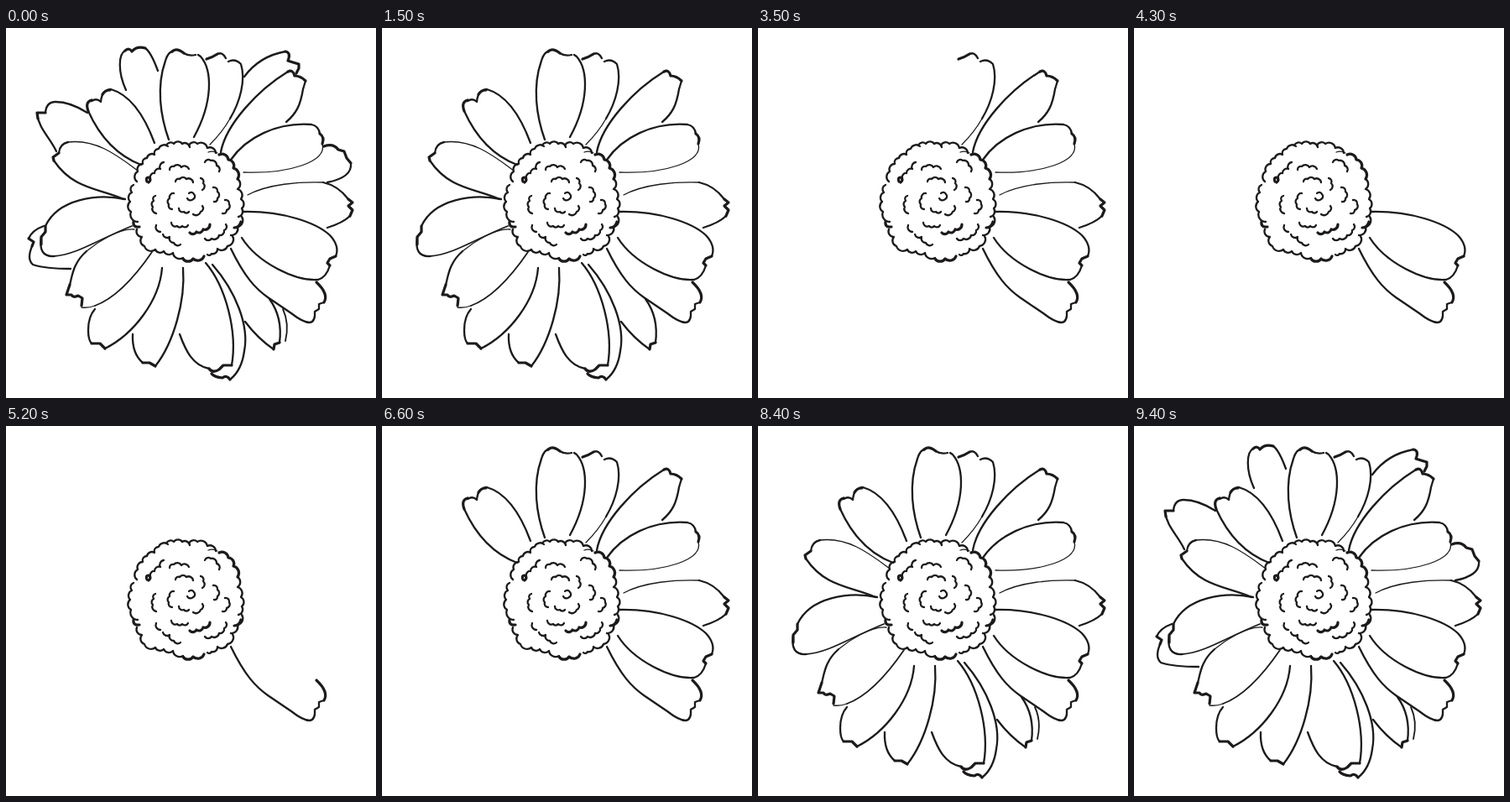
An HTML page that plays this animation: 441x441 px, repeating every 9900 ms.

```html
<!DOCTYPE html>
<html lang="en">
<head>
<meta charset="utf-8">
<title>Daisy</title>
<style>
  html, body { margin: 0; width: 100%; height: 100%; overflow: hidden; background: #fff; }
  svg { display: block; width: 100%; height: 100%; }
  path { fill: none; stroke: #1c1a1b; stroke-width: 2.3; stroke-linecap: round; stroke-linejoin: round; }
  .thin { stroke-width: 1.3; }
  .bold { stroke-width: 3.2; }
</style>
</head>
<body>
<svg viewBox="0 0 441 441">
  <g id="heart">
    <!-- rim, clockwise -->
    <path data-bumps="156,183 157,171 163,162 168,155 177,151 182,144 193,141"/>
    <path data-bumps="191,140 200,138 210,138 219,142"/>
    <path data-bumps="218,140 228,138 240,143 250,149"/>
    <path class="thin" d="M241 148Q247 146 252 149"/>
    <path class="bold" data-bumps="254,151 265,157 271,167 276,180"/>
    <path data-bumps="276,180 276,192 280,204 281,215 277,225"/>
    <path data-bumps="281,225 276,237 268,247"/>
    <path class="bold" d="M280 231Q278 238 272 238"/>
    <path data-bumps="270,248 264,260 252,263 245,269 240,270"/>
    <path class="bold" data-bumps="236,272 223,275 211,275"/>
    <path data-bumps="211,274 199,268 188,266 178,264 165,260 162,249 156,240"/>
    <path class="bold" d="M159 237Q151 238 152 231"/>
    <path data-bumps="157,231 149,219 148,207 150,196 152,187"/>
    <!-- florets -->
    <path class="bold" d="M168 183Q166 178 170 178Q174 181 170 184"/>
    <path data-bumps="172,179 177,173 184,168 188,160"/>
    <path data-bumps="195,169 200,165 209,166 218,168"/>
    <path data-bumps="237,160 244,158 251,164 254,171"/>
    <path data-bumps="202,183 207,180 215,180 223,184"/>
    <path data-bumps="232,179 235,185 234,193"/>
    <path data-bumps="247,190 252,195 252,203 248,207"/>
    <path data-bumps="261,205 266,210 263,217 258,221"/>
    <path data-bumps="198,216 194,210 195,203 200,197"/>
    <path data-bumps="218,197 224,198 223,204 216,203"/>
    <path data-bumps="234,212 232,219 223,222"/>
    <path data-bumps="218,219 212,219 206,215"/>
    <path data-bumps="179,221 175,213 176,206 178,200"/>
    <path data-bumps="217,235 210,236 204,236 197,232"/>
    <path class="bold" data-bumps="243,234 235,240 227,243 219,244"/>
    <path data-bumps="262,234 260,241 254,247 245,251 237,251"/>
    <path data-bumps="184,243 179,235"/>
    <path data-bumps="208,258 200,256 195,249 187,246"/>
  </g>
  <g id="petals">
    <g>
      <path d="M268 263C285 298 298 311 312 321L340 340Q354 351 362 351Q369 350 368 338L373 335L373 329L379 327"/>
      <path class="bold" d="M379 327Q385 317 370 303"/>
    </g>
    <g>
      <path d="M283 219C330 218 370 232 386 247Q398 260 393 272"/>
      <path class="bold" d="M393 272L386 275L383 280L386 283"/>
      <path d="M386 283Q382 297 372 300C345 302 300 280 281 250"/>
    </g>
    <g>
      <path class="thin" d="M288 199C312 186 350 183 378 184"/>
      <path d="M378 184Q396 188 408 204M410 224Q402 232 383 238"/>
      <path class="bold" d="M408 204L413 208L408 212L413 217L410 224"/>
    </g>
    <g>
      <path d="M268 157C286 131 322 112 364 115Q373 117 374 126"/>
      <path class="bold" d="M374 126Q380 130 377 138"/>
      <path class="thin" d="M377 138C383 160 336 174 283 172"/>
    </g>
    <g>
      <path d="M256 148C262 115 300 74 336 52M357 63L354 73C351 92 346 102 334 112"/>
      <path class="bold" d="M336 52Q342 49 344 57Q351 57 357 63"/>
    </g>
    <g>
      <path class="bold" d="M239 37Q246 35 252 31"/>
      <path d="M252 31Q258 28 262 36M265 40Q273 36 280 43C286 62 279 88 267 108"/>
      <path class="thin" d="M267 108Q258 124 243 139"/>
    </g>
    <g>
      <path d="M194 133C184 105 179 70 190 39Q193 29 198 28M212 30Q218 34 226 32M229 32L232 34C246 50 247 88 224 130"/>
      <path class="bold" d="M198 28Q203 23 212 30"/>
    </g>
    <g>
      <path d="M161 163C132 152 112 130 98 99M102 87Q108 83 113 88Q114 74 125 73C146 79 164 102 177 137"/>
      <path class="bold" d="M98 99Q94 88 102 86M115 79Q118 74 124 74"/>
    </g>
    <g>
      <path d="M140 204C110 191 80 192 57 158M63 149Q64 138 74 136"/>
      <path class="bold" d="M57 158L56 154L63 149"/>
      <path class="thin" d="M74 136C108 132 134 153 157 170"/>
    </g>
    <g>
      <path d="M142 204C108 197 62 204 47 236M42 249Q38 273 57 272"/>
      <path class="bold" d="M47 236L47 243L42 249L42 258"/>
      <path d="M57 272C85 270 110 252 150 236" style="stroke-width:1.8"/>
    </g>
    <g>
      <path class="thin" d="M153 240C135 238 108 256 96 266"/>
      <path d="M96 266C80 280 79 295 76 306"/>
      <path class="bold" d="M76 306L72 318L78 318Q80 322 86 319L91 322L90 331"/>
      <path class="thin" d="M90 333Q98 334 106 331"/>
      <path d="M106 331C128 323 150 302 174 267" style="stroke-width:1.8"/>
    </g>
    <g>
      <path d="M186 286C183 325 152 365 118 382M102 376Q98 372 98 360Q98 344 106 335"/>
      <path class="bold" d="M118 382L112 376L102 376"/>
    </g>
    <g>
      <path d="M211 286C214 325 200 375 178 403M163 399Q150 388 151 365"/>
      <path class="bold" d="M178 403L171 399L163 399"/>
    </g>
    <g>
      <path d="M238 280C262 308 276 362 269 402M242 406C222 402 214 384 207 365"/>
      <path class="bold" d="M269 402L259 402L254 407Q246 412 242 406"/>
    </g>
    <g>
      <path d="M246 282C274 314 290 355 284 385Q281 408 267 419"/>
      <path class="bold" d="M267 419Q263 413 258 417Q248 416 245 412"/>
    </g>
    <g>
      <path d="M285 350Q300 370 319 383M326 375Q330 345 314 323"/>
      <path class="bold" d="M319 383L320 377L326 375"/>
    </g>
    <g>
      <path d="M330 335Q338 352 333 373" style="stroke-width:1.8"/>
    </g>
    <g>
      <path class="bold" d="M379 141Q390 137 396 145L403 147L406 155L411 161"/>
      <path d="M411 161Q413 178 383 184"/>
    </g>
    <g>
      <path d="M284 58C298 39 316 31 333 28"/>
      <path class="bold" d="M333 28Q340 29 336 39Q342 41 349 43L349 48L346 54"/>
    </g>
    <g>
      <path d="M143 74C133 52 134 31 142 27M166 24Q173 29 181 51"/>
      <path class="bold" d="M142 27Q147 23 150 28Q156 21 166 24"/>
    </g>
    <g>
      <path d="M60 147C52 130 39 120 37 102M47 101Q48 88 59 88C72 88 86 94 97 101"/>
      <path class="bold" d="M38 108L37 101L47 101"/>
    </g>
    <g>
      <path d="M45 236Q31 241 27 251M32 258Q24 275 32 282Q47 287 77 287"/>
      <path class="bold" d="M27 251L33 255L31 260"/>
    </g>
  </g>
</svg>
<script>
  const LOOP = 9900, STEP = 200, FADE = 500, GROW = 5200;
  const heart = document.getElementById('heart');
  const petals = [...document.getElementById('petals').children];

  // Joins points with small arcs that bulge away from the middle.
  function bumps(text) {
    const pts = text.split(' ').map(p => p.split(',').map(Number));
    return pts.map(([x, y], i) => {
      if (!i) return `M${x} ${y}`;
      const r = 0.6 * Math.hypot(x - pts[i - 1][0], y - pts[i - 1][1]);
      return `A${r} ${r} 0 0 1 ${x} ${y}`;
    }).join('');
  }

  function steps(t, start) {
    const n = Math.floor((t - start) / STEP) + 1;
    return Math.max(0, Math.min(petals.length, n));
  }

  function draw(t) {
    const count = petals.length - steps(t, FADE) + steps(t, GROW);
    heart.style.display = count ? '' : 'none';
    petals.forEach((p, i) => { p.style.display = i < count ? '' : 'none'; });
  }

  for (const p of document.querySelectorAll('[data-bumps]')) {
    p.setAttribute('d', bumps(p.dataset.bumps));
  }

  const begin = performance.now();
  function tick() {
    draw((performance.now() - begin) % LOOP);
    requestAnimationFrame(tick);
  }
  tick();
</script>
</body>
</html>
```
